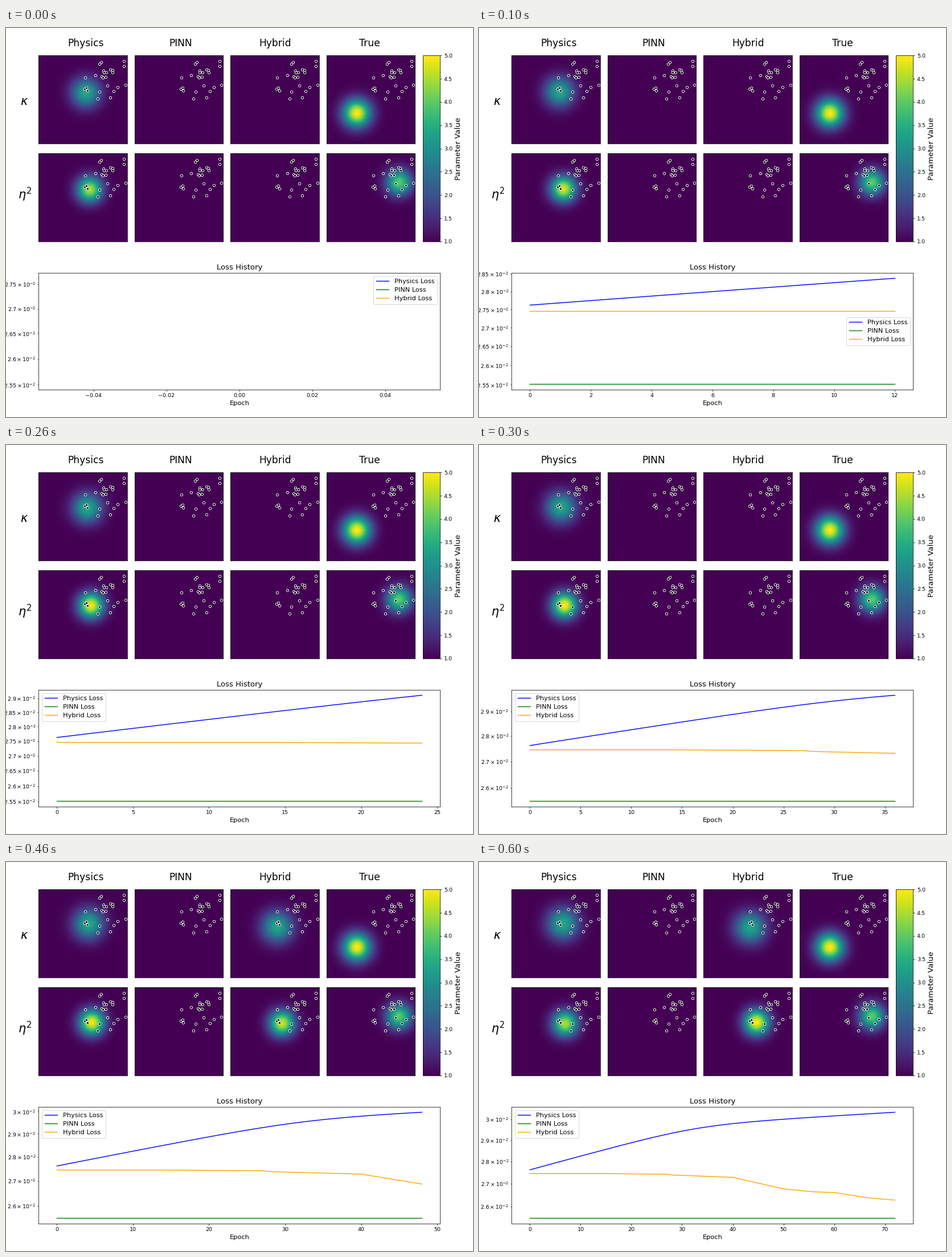
Animation of 820 by 683 pixels, one loop 700 ms. Source, as a matplotlib script:

```python
import numpy as np
import matplotlib.pyplot as plt
from matplotlib.animation import FuncAnimation
from matplotlib.cm import ScalarMappable
from matplotlib.colors import Normalize

W, H = 820, 683
DPI = W / 12
LEFT, TOP, SIDE = 57.45, 48.3, 155.1
PITCH_X, PITCH_Y = 168.5, 171.5
FRAMES = 7
STEP = 12  # epochs per frame
HYBRID_START = 4

fig = plt.figure(figsize=((W + 1e-3) / DPI, (H + 1e-3) / DPI), dpi=DPI,
                 facecolor="white")


def add_axes(left, top, width, height):
    return fig.add_axes([left / W, 1 - (top + height) / H, width / W, height / H])


def label(x, y, text, size):
    fig.text(x / W, 1 - y / H, text, fontsize=size, ha="center", va="baseline")


# Sensors, in pixels from the top left corner of a panel
SENSORS = np.array([
    (149.5, 10), (149.5, 19), (109.5, 12), (106.5, 15), (126, 25),
    (129.5, 26), (130, 30), (114, 27), (114.5, 30), (119, 30),
    (99.5, 35), (82, 39), (111, 37), (113, 39), (118, 38),
    (152.5, 52), (121, 53), (139, 56), (132, 63), (107, 64),
    (103.5, 76), (126, 74), (81, 59), (84, 57), (85.5, 62),
]) / SIDE

grid = (np.arange(128) + 0.5) / 128
X, Y = np.meshgrid(grid, grid)
FLAT = np.ones_like(X)


def bump(cx, cy, peak, sigma):
    r2 = (X - cx) ** 2 + (Y - cy) ** 2
    return 1 + (peak - 1) * np.exp(-r2 / (2 * sigma ** 2))


def physics_maps(p):
    """Kappa and eta estimates at progress p from 0 to 1."""
    ease = 1 - (1 - p) ** 2
    away = (2 * p - 1) ** 2
    return (bump(.534 + .045 * p, .574 + .035 * ease, 3.4, .113 + .009 * p),
            bump(.576 + .028 * ease, .600 - .014 * away, 5 - .5 * away, .1))


def hybrid_maps(k):
    """Kappa and eta estimates k frames after the model starts to learn."""
    if k < 0:
        return FLAT, FLAT
    return (bump(.528, .573 - .0035 * k, 3.35, .122),
            bump(.581 + .009 * k, .590 + .005 * k, 4.7 + .15 * k, .1))


# Losses: a steady climb that saturates, a constant, and a slow stepped descent
epochs = np.arange(STEP * (FRAMES - 1) + 1)
z = epochs / 35
physics = (2.762 + .00145 * epochs + .1695 * z / (1 + z ** 6) ** (1 / 6)) / 100
pinn = np.full(len(epochs), .02551)
KNOTS = [(0, 2.745), (14, 2.745), (27, 2.742), (28, 2.7385), (40, 2.728),
         (50, 2.677), (56, 2.664), (60, 2.661), (67, 2.637), (72, 2.628)]
hybrid = np.interp(epochs, *zip(*KNOTS)) / 100
LOSSES = [("Physics Loss", physics, "blue"),
          ("PINN Loss", pinn, "green"),
          ("Hybrid Loss", hybrid, "orange")]

# Parameter maps
images = {}
for col, name in enumerate(("Physics", "PINN", "Hybrid", "True")):
    label(140.2 + 166 * col, 32, name, 18)
    for row in range(2):
        ax = add_axes(LEFT + PITCH_X * col, TOP + PITCH_Y * row, SIDE, SIDE)
        images[name, row] = ax.imshow(FLAT, vmin=1, vmax=5, cmap="viridis",
                                      origin="lower", extent=(0, 1, 0, 1),
                                      aspect="auto")
        ax.scatter(SENSORS[:, 0], 1 - SENSORS[:, 1], s=20, c="black",
                   edgecolors="white", linewidths=1)
        ax.set(xlim=(0, 1), ylim=(0, 1), xticks=[], yticks=[])
label(32.5, 135, r"$\kappa$", 22)
label(33, 300, r"$\eta^2$", 22)


def show(name, maps):
    for row, data in enumerate(maps):
        images[name, row].set_data(data)


show("True", (bump(.34, .343, 5, .108), bump(.815, .667, 4, .1)))

cax = add_axes(731.8, TOP, 30.5, PITCH_Y + SIDE)
bar = fig.colorbar(ScalarMappable(Normalize(1, 5), "viridis"), cax=cax)
bar.set_label("Parameter Value", fontsize=14)

loss_ax = add_axes(LEFT, 430.1, 704.9, 204.7)


def draw_loss(i):
    loss_ax.clear()
    n = STEP * i + 1
    for name, values, color in LOSSES:
        loss_ax.semilogy(epochs[:n], values[:n], color=color, label=name)
    loss_ax.set_title("Loss History", fontsize=14)
    loss_ax.set_xlabel("Epoch", fontsize=12)
    loc = ("upper right", "center right", "upper left")[min(i, 2)]
    loss_ax.legend(loc=loc, fontsize=12, labelspacing=.44)


def update(i):
    show("Physics", physics_maps(i / (FRAMES - 1)))
    show("Hybrid", hybrid_maps(i - HYBRID_START))
    draw_loss(i)
    return []


anim = FuncAnimation(fig, update, frames=FRAMES, interval=100,
                     init_func=lambda: update(0), repeat=True, repeat_delay=0)
plt.show()
```
